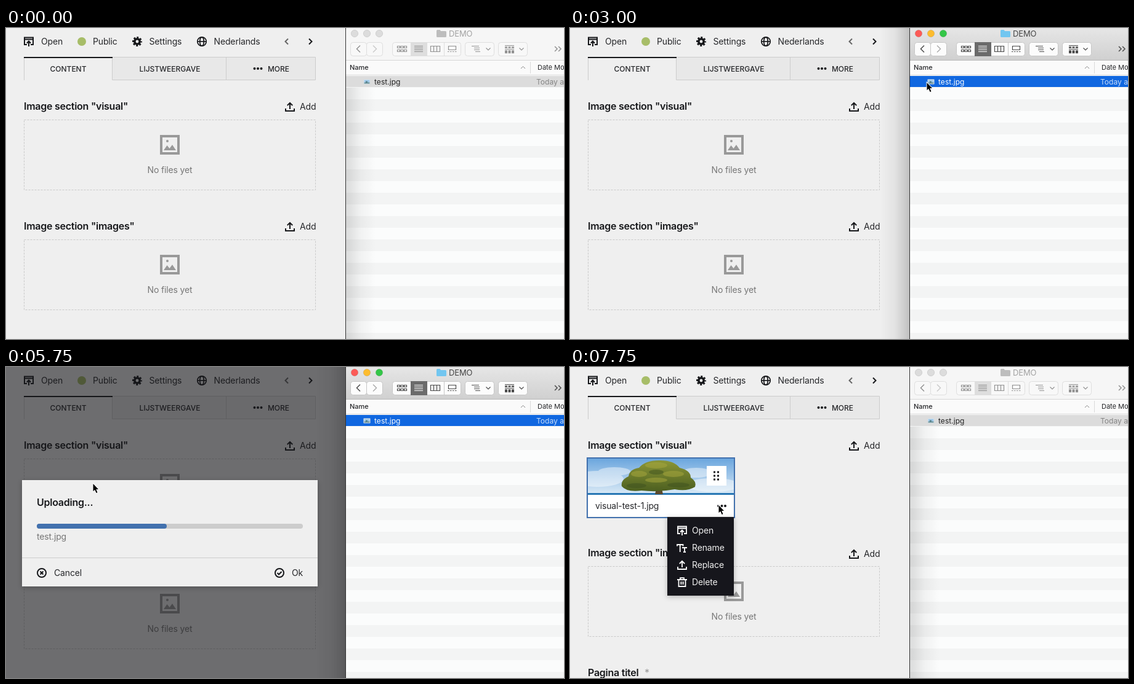
These frames come from a looping animation (906x506 px, 8000 ms). An HTML page:

```html
<!DOCTYPE html>
<html lang="en">
<head>
<meta charset="utf-8">
<title>Upload by drag and drop</title>
<style>
html, body { margin: 0; width: 100%; height: 100%; overflow: hidden; background: #efefef; }
svg { display: block; }
text { font: 14px Inter, sans-serif; letter-spacing: -.01em; fill: #26272a; white-space: pre; }
.h { font-size: 16px; font-weight: 600; letter-spacing: -.016em; fill: #16171a; }
.tab { font-size: 12px; font-weight: 500; letter-spacing: 0; text-anchor: middle; }
.mute { fill: #777; }
.mid { text-anchor: middle; }
.small { font-size: 12px; letter-spacing: .003em; }
.head { font-size: 11px; letter-spacing: 0; }
.line { fill: none; stroke: #16171a; stroke-width: 2; }
.menu text { fill: #efefef; }
.ico { fill: none; stroke-width: 2; stroke: #16171a; }

/* two looks of the file window */
.win { --bar: url(#barOff); --edge: #d6d6d6; --btn: #f8f8f8; --rim: #dedede; --ico: #929292;
  --red: #dcdcdc; --amber: #dcdcdc; --green: #dcdcdc; --sel: #dedede; --selIco: #888;
  --title: #a2a2a2; --folder: #bdbdbd; --row: #dcdcdc; --file: #222; --date: #858585; }
.win.on { --bar: url(#barOn); --edge: #b9b9b9; --btn: #fcfcfc; --rim: #c6c6c6; --ico: #4b4b4b;
  --red: #fc5b57; --amber: #fdbc2e; --green: #34c648; --sel: #6b6b6b; --selIco: #fff;
  --title: #444; --folder: #72c6f0; --row: #1067e0; --file: #fff; --date: #c7dcf8; }
.btn { fill: var(--btn); stroke: var(--rim); }
.wi { fill: none; stroke: var(--ico); stroke-width: 1.2; }

/* hard cuts on a 250 ms beat: 3.125% each */
.on, .rename, .ghost, .plus, .drop, .empty, .sec2, .add2, .dialog, .card, .grip, .menu, .cursor {
  animation: 8s step-end infinite; }
.on { animation-name: on; }
.rename { animation-name: rename; }
.ghost { animation-name: ghost; }
.plus, .drop { animation-name: drop; }
.empty { animation-name: empty; }
.sec2 { animation-name: sec2; }
.add2 { animation-name: add2; }
.dialog { animation-name: dialog; }
.card { animation-name: card; }
.grip { animation-name: grip; }
.menu { animation-name: menu; }
.cursor { animation-name: cursor; }
@keyframes on { 0%, 75% { opacity: 0 } 18.75% { opacity: 1 } 100% { opacity: 0 } }
@keyframes rename { 0%, 34.375%, 100% { opacity: 0 } 25% { opacity: 1 } }
@keyframes ghost { 0%, 71.875%, 100% { opacity: 0 } 50% { opacity: 1 } }
@keyframes drop { 0%, 71.875%, 100% { opacity: 0 } 53.125% { opacity: 1 } }
@keyframes dialog { 0%, 75%, 100% { opacity: 0 } 71.875% { opacity: 1 } }
@keyframes empty { 0% { opacity: 1 } 78.125%, 100% { opacity: 0 } }
@keyframes card { 0% { opacity: 0 } 78.125%, 100% { opacity: 1 } }
@keyframes grip { 0% { opacity: 0 } 87.5%, 100% { opacity: 1 } }
@keyframes menu { 0% { opacity: 0 } 96.875%, 100% { opacity: 1 } }
@keyframes sec2 { 0% { transform: translate(0, 195px) } 78.125%, 100% { transform: translate(0, 175px) } }
@keyframes add2 { 0% { transform: translate(0, 195px) } 78.125%, 100% { transform: translate(0, 176px) } }
@keyframes cursor {
  0% { transform: translate(-99px, 0) }
  3.125% { transform: translate(564px, 9px) }
  6.25% { transform: translate(577px, 44px) }
  9.375% { transform: translate(597px, 87px) }
  12.5% { transform: translate(597px, 88px) }
  25% { transform: translate(581px, 89px) }
  28.125% { transform: translate(584px, 87px) }
  37.5% { transform: translate(579px, 88px) }
  40.625% { transform: translate(578px, 89px) }
  50% { transform: translate(328px, 170px) }
  53.125% { transform: translate(240px, 180px) }
  59.375% { transform: translate(198px, 180px) }
  62.5% { transform: translate(163px, 181px) }
  65.625% { transform: translate(146px, 185px) }
  71.875% { transform: translate(141px, 189px) }
  87.5% { transform: translate(224px, 197px) }
  90.625% { transform: translate(241px, 218px) }
  93.75%, 100% { transform: translate(241px, 224px) }
}
</style>
</head>
<body>
<svg width="906" height="506" viewBox="0 0 906 506">
<defs>
  <linearGradient id="barOn" x2="0" y2="1"><stop stop-color="#e6e6e6"/><stop offset="1" stop-color="#d0d0d0"/></linearGradient>
  <linearGradient id="barOff"><stop stop-color="#f6f6f6"/></linearGradient>
  <linearGradient id="shade"><stop stop-opacity="0"/><stop offset=".5" stop-opacity=".05"/><stop offset="1" stop-opacity=".2"/></linearGradient>
  <linearGradient id="inner"><stop stop-opacity=".13"/><stop offset=".5" stop-opacity=".04"/><stop offset="1" stop-opacity="0"/></linearGradient>
  <linearGradient id="sky" x2="0" y2="1"><stop stop-color="#6ba6de"/><stop offset="1" stop-color="#dcebf6"/></linearGradient>
  <linearGradient id="leaf" x2="0" y2="1"><stop stop-color="#8c9636"/><stop offset="1" stop-color="#4c5f20"/></linearGradient>
  <linearGradient id="add" x2="0" y2="1"><stop stop-color="#5cc94a"/><stop offset="1" stop-color="#119a0c"/></linearGradient>
  <filter id="soft" x="-20%" y="-20%" width="140%" height="140%"><feDropShadow dx="0" dy="2" stdDeviation="4" flood-opacity=".25"/></filter>
  <pattern id="rows" width="354" height="38" y="97" patternUnits="userSpaceOnUse">
    <rect width="354" height="19" fill="#fbfcfc"/><rect y="19" width="354" height="19" fill="#f3f4f4"/>
  </pattern>
  <clipPath id="photo"><path d="M29 149h237v59H29z"/></clipPath>

  <path id="open" d="M5 13H1V1.5h14V13h-4M1 4.500h14M8 16V7.500M4.800 10.700 8 7.500l3.200 3.200"/>
  <path id="upload" d="M1 11v4h14v-4M8 12V2M3.800 6 8 1.800 12.200 6"/>
  <path id="rename" d="M0 3h9.500M4.700 3v12M0 2v3.500M9.500 2v3.500M8 8h8M12 8v7M10 15h4"/>
  <path id="trash" d="M0 4h16M5 4V1.200h6V4M2.500 4v11h11V4M6.400 7v5M9.600 7v5"/>
  <path id="chev" d="M0 0 3.500 3.500 7 0"/>
  <g id="dots"><circle cx="-5.500" r="2"/><circle r="2"/><circle cx="5.500" r="2"/></g>
  <path id="grid" d="M0 0h4v3H0zM5.500 0h4v3h-4zM11 0h4v3h-4zM0 6h4v3H0zM5.500 6h4v3h-4zM11 6h4v3h-4z"/>

  <g id="file">
    <path fill="#fff" stroke="#c6ced4" stroke-width=".6" d="M.3.3h10.400v7.400H.3z"/>
    <path fill="#9cc6e8" d="M1 1h9v4H1z"/><path fill="#5b8790" d="M1 5h9v2H1zM3.500 3h3v3h-3z"/>
  </g>

  <g id="zone">
    <path d="M29.500 149.500h473v114h-473z" fill="none" stroke="#c9c9c9" stroke-dasharray="3 2"/>
    <path d="M252 176h28v28h-28z" fill="none" stroke="#999" stroke-width="4"/>
    <path d="M256 199l5.500-8 4 5 4.500-6 6 9z" fill="#999"/><circle cx="262" cy="184" r="2" fill="#999"/>
    <text class="mute mid" x="266" y="236">No files yet</text>
  </g>
  <g id="addBtn">
    <use href="#upload" class="ico" x="453" y="120"/>
    <text x="477" y="133">Add</text>
  </g>

  <g id="window">
    <path d="M552 0h354v506H552z" fill="url(#rows)"/>
    <path d="M552 0h354v52H552z" style="fill:var(--bar)"/>
    <path d="M552 52.500h354" style="stroke:var(--edge)"/>
    <g stroke="#000" stroke-opacity=".1">
      <circle cx="566" cy="9" r="5.700" style="fill:var(--red)"/>
      <circle cx="586" cy="9" r="5.700" style="fill:var(--amber)"/>
      <circle cx="606" cy="9" r="5.700" style="fill:var(--green)"/>
    </g>
    <path d="M699 4.500q0-1.500 1.500-1.500h4l1.500 2h7.500q1.500 0 1.500 1.500v7q0 1.500-1.500 1.500h-13q-1.500 0-1.500-1.500z" style="fill:var(--folder)"/>
    <text x="719" y="14" style="fill:var(--title);font-size:13px">DEMO</text>

    <g class="btn">
      <rect x="559.500" y="23.500" width="26" height="22" rx="4"/>
      <rect x="585.500" y="23.500" width="26" height="22" rx="4"/>
      <rect x="627.500" y="23.500" width="111" height="22" rx="4"/>
      <rect x="745.500" y="23.500" width="47" height="22" rx="4"/>
      <rect x="799.500" y="23.500" width="47" height="22" rx="4"/>
      <path d="M711.500 24v21"/>
    </g>
    <path d="M657 23h27v23h-27z" style="fill:var(--sel)"/>
    <path d="M663 29.500h14M663 32.500h14M663 35.500h14M663 38.500h14" class="wi" style="stroke:var(--selIco)"/>
    <g class="wi">
      <path d="M575 28.500 569.500 34l5.500 5.500" stroke-width="1.500"/>
      <path d="M596 28.500l5.500 5.500-5.500 5.500" stroke-width="1.500" opacity=".45"/>
      <use href="#grid" x="635.500" y="29.500"/>
      <path d="M689.500 29.500h15v9h-15zM694.500 29.500v9M699.500 29.500v9"/>
      <path d="M718.500 29.500h12v6h-12zM717 38.500h2.500M721 38.500h2.500M725 38.500h2.500M729 38.500h2.500"/>
      <path d="M756 29.500h12M760 32.500h9M760 35.500h9M762 38.500h8"/>
      <use href="#chev" x="779.500" y="32.500"/>
      <path d="M810 28.500h15M810 34.500h15"/>
      <path d="M810 31.500h15M810 37.500h15M810 40h15" stroke-width="2.500" stroke-dasharray="4 1.500"/>
      <use href="#chev" x="833.500" y="32.500"/>
      <path d="M891 30l4 4-4 4M897 30l4 4-4 4" stroke-width="1.500"/>
    </g>

    <path d="M552 53h354v23H552z" fill="#fafafa"/>
    <path d="M552 76.500h354M851.500 55v19" stroke="#dadada"/>
    <path d="M552 77h354v2H552z" fill="#fcfcfc"/>
    <text class="head" x="558" y="68" style="font-weight:500">Name</text>
    <path d="M836 66l3.500-3.500 3.500 3.500" fill="none" stroke="#888"/>
    <text class="head" x="863" y="68">Date Modified</text>
    <path d="M552 78h354v18H552z" style="fill:var(--row)"/>
    <use href="#file" x="580.500" y="83.500"/>
    <text class="small" x="598" y="92" style="fill:var(--file)">test.jpg</text>
    <text class="small" x="861" y="92" style="fill:var(--date)">Today at 10:24</text>
    <path d="M551.500 0v506" stroke="#333"/>
  </g>
</defs>

<path fill="#efefef" d="M0 0h906v506H0z"/>

<!-- top bar -->
<use href="#open" class="ico" x="29" y="14"/>
<text x="57" y="27">Open</text>
<circle cx="123" cy="22" r="7" fill="#a7bd68"/>
<text x="141" y="27">Public</text>
<circle class="line" cx="213" cy="22" r="4.200" style="stroke-width:3.600"/>
<circle class="line" cx="213" cy="22" r="6.500" style="stroke-width:3" stroke-dasharray="2.800 2.305" stroke-dashoffset="1.400"/>
<text x="232.500" y="27">Settings</text>
<g class="line" style="stroke-width:1.700">
  <circle cx="318" cy="22" r="7.200"/><ellipse cx="318" cy="22" rx="3.300" ry="7.200"/><path d="M311 22h14"/>
</g>
<text x="337.500" y="27">Nederlands</text>
<path class="line" d="M458 17.500 453.500 22l4.500 4.500" style="stroke:#666"/>
<path class="line" d="M492 17.500l4.500 4.500-4.500 4.500"/>

<!-- tabs -->
<path d="M173 47h330v38H173z" fill="#e8e8e8"/>
<path d="M29.500 48v37M172.500 48v36.500h330v-37h-330M357.500 48v37" fill="none" stroke="#ccc"/>
<path d="M29 47h144v2H29z" fill="#16171a"/>
<text class="tab" x="101" y="71">CONTENT</text>
<text class="tab" x="266" y="71">LIJSTWEERGAVE</text>
<use href="#dots" x="409" y="66" fill="#16171a"/>
<text class="tab" x="442.500" y="71">MORE</text>

<!-- sections -->
<text class="h" x="29" y="133">Image section "visual"</text>
<use href="#addBtn"/>
<g class="empty"><use href="#zone"/></g>
<g class="sec2">
  <text class="h" x="29" y="133">Image section "images"</text>
  <use href="#zone"/>
</g>
<g class="add2"><use href="#addBtn"/></g>
<g class="drop" fill="none" stroke="#4271ae">
  <path d="M27.500 147.500h477v118h-477z" stroke-width="3" stroke-opacity=".28"/>
  <path d="M28.500 148.500h475v116h-475z" stroke-width="1.400"/>
</g>

<!-- uploaded file -->
<g class="card">
  <path d="M29 149h237v95H29z" fill="#fff" stroke="#000" stroke-opacity=".06"/>
  <g clip-path="url(#photo)">
    <path d="M29 149h237v59H29z" fill="url(#sky)"/>
    <g fill="#fff" opacity=".45">
      <ellipse cx="45" cy="182" rx="42" ry="13"/><ellipse cx="72" cy="170" rx="26" ry="7"/>
      <ellipse cx="232" cy="192" rx="44" ry="11"/><ellipse cx="205" cy="172" rx="24" ry="8"/>
    </g>
    <path d="M29 205h237v3H29z" fill="#2877b4"/>
    <path d="M138 207l2-9h9l2 9z" fill="#5b4a2c"/>
    <path d="M84 194Q82 184 95 178 97 166 112 164 122 152 144 152 168 151 178 164 196 168 196 180 206 186 203 195 190 203 170 199 144 204 116 201 92 204 84 194Z" fill="url(#leaf)"/>
    <g fill="#a9a83e" opacity=".5">
      <ellipse cx="140" cy="160" rx="18" ry="5"/><ellipse cx="112" cy="174" rx="13" ry="5"/>
      <ellipse cx="168" cy="174" rx="17" ry="5"/><ellipse cx="140" cy="184" rx="18" ry="4"/>
    </g>
    <g fill="#3f5220" opacity=".5">
      <ellipse cx="108" cy="193" rx="16" ry="4"/><ellipse cx="176" cy="192" rx="18" ry="4"/><ellipse cx="140" cy="171" rx="12" ry="4"/>
    </g>
  </g>
  <text x="41" y="231">visual-test-1.jpg</text>
  <use href="#dots" x="246.500" y="226" fill="#16171a"/>
  <text class="h" x="29" y="503">Pagina titel</text>
  <text class="h" x="121" y="503" style="fill:#999;font-weight:400">*</text>
</g>
<g class="grip">
  <path d="M222 161h32v32h-32z" fill="#fff"/>
  <path d="M234.500 169.500v16M240.500 169.500v16" stroke="#16171a" stroke-width="3" stroke-dasharray="3 3"/>
</g>
<g class="menu">
  <path d="M28 148h239v97H28z" fill="none" stroke="#4271ae" stroke-width="2"/>
  <path d="M158 244h108v128H158z" fill="#16171a" filter="url(#soft)"/>
  <g class="ico" style="stroke:#fff;stroke-width:1.800">
    <use href="#open" x="174" y="258"/><use href="#rename" x="174" y="286"/>
    <use href="#upload" x="174" y="314"/><use href="#trash" x="174" y="342"/>
  </g>
  <text x="198" y="271">Open</text>
  <text x="198" y="299">Rename</text>
  <text x="198" y="327">Replace</text>
  <text x="198" y="355">Delete</text>
</g>

<!-- file window -->
<g class="win">
  <use href="#window"/>
  <path d="M552 97h48v409h-48z" fill="url(#inner)"/>
</g>
<g class="win on">
  <path d="M504 0h48v506h-48z" fill="url(#shade)"/>
  <use href="#window"/>
</g>
<g class="rename">
  <path d="M594.500 81.500h50v16h-50z" fill="#fff" stroke="#8fb9f2"/>
  <path d="M598 83h22v13h-22z" fill="#b3d7ff"/>
  <text class="small" x="598" y="92">test.jpg</text>
</g>

<!-- upload dialog -->
<g class="dialog">
  <path d="M0 0h551v506H0z" fill="#efefef" opacity="0"/>
  <path d="M0 0h551v506H0z" fill="#16171a" opacity=".6"/>
  <path d="M26 184h480v173H26z" fill="#efefef" filter="url(#soft)"/>
  <text class="h" x="50" y="226">Uploading...</text>
  <rect x="50" y="255" width="432" height="8" rx="4" fill="#ccc"/>
  <rect x="50" y="255" width="211" height="8" rx="4" fill="#4271ae"/>
  <text class="mute" x="50" y="281">test.jpg</text>
  <path d="M26 310.500h480" stroke="#ccc"/>
  <g class="line">
    <circle cx="58" cy="335" r="7"/><path d="M55.500 332.500l5 5m0-5l-5 5"/>
    <circle cx="444" cy="335" r="7"/><path d="M440.500 335l2.500 2.500 4.500-4.500"/>
  </g>
  <text x="78" y="340">Cancel</text>
  <text x="464" y="340">Ok</text>
</g>

<g class="cursor">
  <g class="ghost">
    <use href="#file" x="-3" y="-2" opacity=".4"/>
    <rect x="11" y="-6" width="53" height="16" rx="8" fill="#1f66d6"/>
    <text class="small" x="14" y="6" style="fill:#fff">test.jpg</text>
  </g>
  <path d="M.5 1V13.300L3.300 10.700 5.600 16 7.500 15.200 5.300 10H9Z" stroke="#fff" stroke-width="1.800" paint-order="stroke"/>
  <g class="plus">
    <circle cx="9" cy="21" r="9.300" fill="url(#add)" stroke="#e6f3e4" stroke-width=".8"/>
    <path d="M9 16v10M4 21h10" stroke="#fff" stroke-width="2.400"/>
  </g>
</g>
</svg>
</body>
</html>
```
